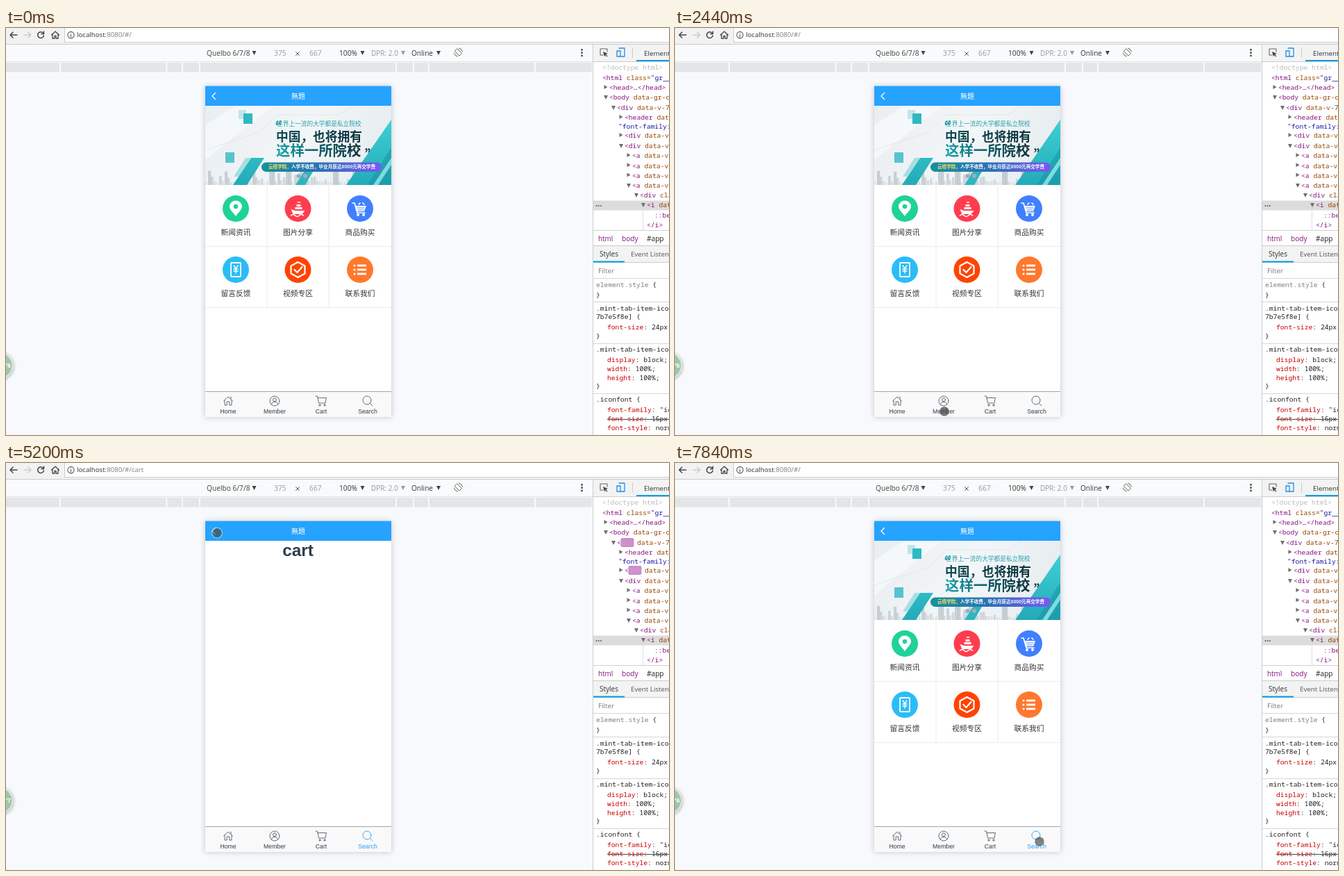
Animation of 955x586 px, one loop 8000 ms. Source, as an HTML page with a canvas:

```html
<!DOCTYPE html>
<html lang="en">
<head>
<meta charset="utf-8">
<title>Tab bar demo</title>
<style>
html, body { margin: 0; width: 100%; height: 100%; overflow: hidden; background: #f8f9fc; }
canvas { display: block; }
</style>
</head>
<body>
<canvas id="stage" width="955" height="586"></canvas>
<script>
const ctx = document.getElementById("stage").getContext("2d");
const LOOP = 8000;
const UI = '"Open Sans", "Noto Sans", sans-serif';
const MONO = '"Noto Sans Mono", "DejaVu Sans Mono", monospace';
const CJK = '"Noto Sans CJK SC", "Noto Sans CJK", sans-serif';
const ARIAL = '"Liberation Sans", Arial, sans-serif';
const PURPLE = "#881280", BROWN = "#994500", NAVY = "#1a1aa6", BLUE = "#26a2ff";

// cursor keys: time, x, y
const path = [
  [0, 870, 602], [69, 870, 602], [70, 854, 589], [360, 486, 201], [480, 486, 201],
  [690, 390, 194], [830, 378, 187], [990, 372, 184], [1150, 372, 184], [1450, 370, 300],
  [1980, 396, 588], [2080, 396, 588], [2290, 388, 552], [2560, 388, 552], [2980, 448, 551],
  [3360, 454, 549], [3520, 454, 549], [3900, 521, 547], [4360, 521, 547], [5080, 306, 101],
  [5140, 306, 101], [5280, 301, 100], [5950, 301, 100], [6380, 505, 570], [6440, 505, 570],
  [6800, 530, 574], [7220, 535, 541], [7300, 535, 541], [7540, 541, 539], [7840, 525, 545],
  [8000, 525, 545]
];
const routes = [[0, ""], [2650, "member"], [3210, "cart"], [3830, "search"],
  [5050, "cart"], [5590, "member"], [5750, ""]];
const tabs = [[0, -1], [2650, 1], [3210, 2], [3830, 3]];
const badges = [[0, "76"], [290, "75"], [2210, "76"], [4900, "77"], [6200, "76"]];
// DOM update flashes: time, whether the head flashes too
const flashes = [[2900, 1], [3330, 1], [3800, 1], [5100, 0], [5600, 0], [5870, 0]];
const presses = [2360, 3130, 3760, 5000, 5540, 5700];

const at = (list, t) => list.filter(k => k[0] <= t).pop()[1];

function cursorAt(t) {
  const i = Math.max(1, path.findIndex(k => k[0] > t));
  const [t0, x0, y0] = path[i - 1], [t1, x1, y1] = path[i];
  const p = (t - t0) / (t1 - t0), e = p * p * (3 - 2 * p);
  return [x0 + (x1 - x0) * e, y0 + (y1 - y0) * e];
}

function rect(x, y, w, h, color) {
  ctx.fillStyle = color;
  ctx.fillRect(x, y, w, h);
}

function disc(x, y, r, color) {
  ctx.fillStyle = color;
  ctx.beginPath();
  ctx.arc(x, y, r, 0, 7);
  ctx.fill();
}

function poly(color, ...p) {
  ctx.fillStyle = color;
  ctx.beginPath();
  for (let i = 0; i < p.length; i += 2) ctx.lineTo(p[i], p[i + 1]);
  ctx.fill();
}

function pill(x, y, w, h, r, color) {
  ctx.fillStyle = color;
  ctx.beginPath();
  ctx.roundRect(x, y, w, h, r);
  ctx.fill();
}

function shape(d, x, y, color, width) {
  const p = new Path2D(d);
  ctx.save();
  ctx.translate(x, y);
  ctx.lineJoin = ctx.lineCap = "round";
  if (width) {
    ctx.strokeStyle = color;
    ctx.lineWidth = width;
    ctx.stroke(p);
  } else {
    ctx.fillStyle = color;
    ctx.fill(p, "evenodd");
  }
  ctx.restore();
}

// y is the visual middle of the line; returns the end x
function text(s, x, y, size, color, font = UI, align = "left", weight = 400) {
  ctx.font = `${weight} ${size}px ${font}`;
  ctx.textAlign = align;
  ctx.fillStyle = color;
  ctx.fillText(s, x, y + size * 0.36);
  return x + ctx.measureText(s).width;
}

const code = (s, x, y, color) => text(s, x, y, 9.7, color, MONO);
const ring = (x, y, r) => `M${x + r} ${y}A${r} ${r} 0 1 1 ${x - r} ${y}A${r} ${r} 0 1 1 ${x + r} ${y}`;
const caret = (x, y, color, s = 3) => poly(color, x - s, y - s, x + s, y - s, x, y + s);

function linear(x0, y0, x1, y1, ...colors) {
  const g = ctx.createLinearGradient(x0, y0, x1, y1);
  colors.forEach((c, i) => g.addColorStop(i / (colors.length - 1), c));
  return g;
}

function toolbar(route) {
  rect(0, 0, 955, 23, "#f2f2f2");
  rect(84, 0, 871, 20, "#fff");
  rect(84, 20, 871, 1, "#ccc");
  rect(84, 0, 1, 20, "#ccc");
  rect(0, 23, 955, 1, "#c9cbcd");
  shape("M5 0H-5M-1 -4L-5 0L-1 4", 11, 10, "#444", 1.5);
  shape("M-5 0H5M1 -4L5 0L1 4", 31, 10, "#ccc", 1.5);
  shape("M4 -2A4.4 4.4 0 1 0 4.4 1M4.5 -5V-1.5H1", 50, 10, "#444", 1.5);
  shape("M-5.5 0L0 -5L5.5 0M-4 -1V5H-1V1.5H1V5H4V-1", 71, 10, "#444", 1.3);
  shape(ring(0, 0, 4.6) + "M0 -.5V2.5M0 -2.5V-2.4", 93.5, 10, "#555", 1.1);
  const x = text("localhost", 102, 10, 9.7, "#333");
  text(":8080/#/" + route, x, 10, 9.7, "#7d7d7d");

  rect(0, 24, 846, 24, "#f9fafb");
  rect(0, 48, 846, 1, "#dfe1e3");
  text("Quelbo 6/7/8", 289, 36, 10.2, "#444");
  caret(357.5, 36, "#444");
  text("375", 386, 36, 10.3, "#999");
  shape("M-2.5 -2.5L2.5 2.5M2.5 -2.5L-2.5 2.5", 420, 37, "#555", 1);
  text("667", 437, 36, 10.3, "#999");
  text("100%", 480, 36, 10.2, "#333");
  caret(513.5, 36, "#444");
  text("DPR: 2.0", 526, 36, 10, "#999");
  caret(572, 36, "#999");
  text("Online", 584, 36, 10.1, "#333");
  caret(623, 36, "#444");
  shape("M-1.5 -5L5 1.5L1.5 5L-5 -1.5ZM-6 1A6 6 0 0 0 -1 6M6 -1A6 6 0 0 0 1 -6", 651.5, 35, "#666", 1);
  for (let i = -1; i < 2; i++) disc(829.5, 35.5 + i * 4.2, 1.5, "#555");

  rect(0, 50, 844, 13.5, "#e4e5e6");
  for (const gap of [78, 231.5, 254, 279, 562, 587, 609, 762]) rect(gap - 1, 50, 2, 13.5, "#f8f9fc");
}

function tag(s, x, y, open) {
  if (open === 1) caret(x - 5, y, "#6e6e6e", 3);
  if (open === 0) poly("#6e6e6e", x - 7.5, y - 4, x - 2.5, y - 1, x - 7.5, y + 2);
  const [, name, attr, value] = s.match(/^(\S*)([^"]*)(.*)$/);
  x = code(name, x, y, PURPLE);
  x = code(attr, x, y, BROWN);
  code(value, x, y, NAVY);
}

function rule(y, name, value) {
  const x = code(name, 866, y, "#c80000");
  return code(": " + value, x, y, "#222");
}

function flash(x, y, name, level) {
  if (level <= 0) return;
  const w = name.length * 5.82;
  pill(x - 0.5, y - 7, w + 1.5, 13, 2, `rgba(193,122,191,${level})`);
  code(name, x, y, `rgba(226,180,222,${level})`);
}

function devtools(t) {
  rect(846, 24, 109, 562, "#fff");
  rect(846, 24, 109, 24, "#f3f3f3");
  rect(846, 48, 109, 1, "#ccc");
  shape("M-1 4H-5V-5H5V-1", 861, 35, "#666", 1.1);
  shape("M-1 -1L6 2L3 3L5.5 5.5L4.5 6.5L2 4L1 6.5Z", 861, 35, "#444");
  shape("M-3 -6H5V6H-1M-6 -2H-1V6H-6Z", 886, 35, "#1a8ff0", 1.3);
  rect(902, 28, 1, 15, "#ccc");
  text("Elements", 919, 36, 9.8, "#333");
  rect(908, 46, 47, 2, "#039be5");

  rect(846, 248.5, 109, 14, "#dcdcdc");
  rect(917, 263, 1, 28, "#ddd");
  code("<!doctype html>", 859, 57, "#bbb");
  tag('<html class="gr__', 859, 72);
  tag("<head>…</head>", 869, 86, 0);
  tag("<body data-gr-c", 869, 100, 1);
  tag("<div data-v-7b", 880, 115, 1);
  tag("<header data-v", 891, 129, 0);
  code('"font-family:', 882, 142, NAVY);
  tag("<div data-v-7", 891, 155, 0);
  tag("<div data-v-7", 891, 170, 1);
  for (let i = 0; i < 4; i++) tag("<a data-v-7", 902, 184 + i * 14.3, i > 2 ? 1 : 0);
  tag("<div class", 913, 241, 1);
  tag("<i data-v", 923, 255, 1);
  for (let i = 0; i < 3; i++) disc(850.5 + i * 3.2, 256, 1.1, "#666");
  code("::before", 934, 270, PURPLE);
  code("</i>", 923, 284, PURPLE);

  const last = flashes.filter(f => f[0] <= t).pop();
  if (last) {
    const level = 0.95 * Math.max(0, 1 - (t - last[0]) / 1350) ** 1.5;
    if (last[1]) flash(875, 86, "head", level);
    flash(886, 115, "div", level);
    flash(897, 155, "div", level);
  }

  rect(846, 291, 109, 295, "#fff");
  rect(846, 291, 109, 1, "#d0d0d0");
  text("html", 853, 303, 9.9, PURPLE);
  text("body", 887, 303, 10.1, PURPLE);
  text("#app", 923, 303, 10.1, "#222");
  rect(846, 313, 109, 24, "#f3f3f3");
  rect(846, 313, 109, 1, "#ccc");
  rect(846, 337, 109, 1, "#ccc");
  text("Styles", 855, 325, 10, "#333");
  text("Event Listeners", 900, 325, 9.8, "#555");
  rect(846, 335.5, 45, 2, "#039be5");
  text("Filter", 853, 349, 9.8, "#777");
  for (const y of [360, 394, 454, 526]) rect(846, y, 109, 1, "#d6d6d6");

  code("{", code("element.style ", 850, 370, "#808080"), 370, "#222");
  for (const y of [385, 444, 516]) code("}", 850, y, "#222");
  for (const y of [404, 463]) code(".mint-tab-item-icon", 850, y, "#222");
  code("7b7e5f8e] {", 850, 416, "#222");
  rule(431, "font-size", "24px;");
  rule(478, "display", "block;");
  rule(491, "width", "100%;");
  rule(504, "height", "100%;");
  code(".iconfont {", 850, 535, "#222");
  rule(550, "font-family", '"iconfont"');
  rule(563, "font-size", "16px;");
  rect(866, 563, 89, 1, "#444");
  rule(576, "font-style", "normal;");
  rect(845, 24, 1, 562, "#cdcdcd");
}

function banner() {
  ctx.save();
  ctx.beginPath();
  ctx.rect(287, 112, 268, 114);
  ctx.clip();
  rect(287, 112, 268, 114, linear(287, 112, 555, 226, "#e9eef2", "#f3f6f8", "#e3eaee"));
  poly("#f5f8fa", 287, 140, 330, 112, 385, 112, 287, 190);
  shape("M365 150L390 125H480L500 112M287 176L365 150", 0, 0, "#d9e3e8", 0.7);
  // skyline
  for (let i = 0; i < 68; i++) {
    const r = Math.abs(Math.sin(i * 12.99) * 43758.5) % 1;
    const h = 4 + r * r * 21;
    rect(287 + i * 4, 226 - h, 2 + r * 2.5, h, `rgba(120,138,150,${0.16 + r * 0.2})`);
  }
  const teal = linear(0, 130, 0, 226, "#3fd0d4", "#23abb8");
  rect(335, 118, 11, 13, "#bfe6ea");
  rect(342, 123, 13, 15, "#2fb9c4");
  rect(316, 179, 13, 15, "#55c4cf");
  poly(teal, 353, 187, 372, 187, 347, 226, 327, 226);
  poly("#a5dfe4", 345, 187, 353, 187, 335, 214, 328, 214);
  poly(teal, 555, 132, 555, 226, 490, 226);
  poly("rgba(20,145,160,.5)", 555, 172, 555, 226, 521, 226);
  poly("#7fdbe0", 555, 187, 555, 197, 536, 226, 529, 226);
  poly("#2fb5bf", 429, 207, 442, 207, 431, 226, 417, 226);

  text("“", 376, 143, 21, "#1d9aa5", CJK, "left", 900);
  text("世界上一流的大学都是私立院校", 390, 138, 8.7, "#25a0aa", CJK);
  text("中国，也将拥有", 389, 157, 17.7, linear(389, 0, 513, 0, "#0d4a52", "#0a3037"), CJK, "left", 900);
  text("这样一所院校", 389, 177, 20.4, linear(389, 0, 513, 0, "#16a3ad", "#12606a", "#0a2b32"), CJK, "left", 900);
  text("”", 517, 183, 19, "#0d3b42", CJK, "left", 900);
  pill(368, 193.5, 173, 13.5, 6.7, linear(368, 0, 541, 0, "#15919e", "#2d70b5", "#7b57f5"));
  const x = text("云梧学院，", 378, 200, 6.6, "#ffe05a", CJK, "left", 700);
  text("入学不收费，毕业月薪达8000元再交学费", x, 200, 6.6, "#fff", CJK, "left", 700);
  disc(421.5, 213, 3, "#a3adb3");
  disc(431, 213, 3, "#a3adb3");
  ctx.restore();
}

const cells = [
  ["新闻资讯", "#1fd298", (x, y) =>
    shape("M0 11C-3 6 -9 2 -9 -3A9 8.5 0 0 1 9 -3C9 2 3 6 0 11Z" + ring(0, -3, 3.3), x, y, "#fff")],
  ["图片分享", "#ff3d4f", (x, y) => {
    shape("M-10 1L-4 3H10L6 8H-7ZM-4 -2H6V1H-4ZM-2 -6H4V-3H-2Z", x, y, "#fff");
    shape("M-10 10Q-7 7 -4 10T2 10T8 10M0 -9H3", x, y, "#fff", 1.6);
  }],
  ["商品购买", "#4080ff", (x, y) => {
    shape("M-7 -4H9L6 4H-5Z" + ring(-3, 9, 2) + ring(5, 9, 2), x, y, "#fff");
    shape("M-11 -8H-8L-4 6H7M-2 -6L0 -8M4 -8L6 -6", x, y, "#fff", 1.7);
    shape("M-4 -1H6M-3 2H5", x, y, "#4080ff", 0.9);
  }],
  ["留言反馈", "#2abdf7", (x, y) => {
    shape("M-6 -10H6Q7 -10 7 -9V9Q7 10 6 10H-6Q-7 10 -7 9V-9Q-7 -10 -6 -10Z", x, y, "#fff", 1.8);
    shape("M-3 -6L0 -2L3 -6M0 -2V5M-3 -1H3M-3 2H3", x, y, "#fff", 1.4);
  }],
  ["视频专区", "#ff4303", (x, y) =>
    shape("M0 -11L10 -5.5V5.5L0 11L-10 5.5V-5.5ZM-5 0L-1 4L6 -4", x, y, "#fff", 2.2)],
  ["联系我们", "#ff782d", (x, y) => {
    for (const dy of [-6, 0, 6]) {
      disc(x - 8, y + dy, 1.6, "#fff");
      rect(x - 4, y + dy - 1.4, 13, 2.8, "#fff");
    }
  }]
];

const tabItems = [
  ["Home", "M-6.5 0L0 -6L6.5 0M-5 -1V6H-1.8V1H1.8V6H5V-1M4 -6V-3"],
  ["Member", ring(0, 0, 7) + ring(0, -1.8, 2.5) + "M-4.5 5C-4 0 4 0 4.5 5"],
  ["Cart", "M-8 -7H-5.5L-3.5 3H6L7.5 -4.5H-5" + ring(-2, 6, 1.2) + ring(5, 6, 1.2)],
  ["Search", ring(-1, -1, 6) + "M3.4 3.4L7 7"]
];

function phone(route, tab) {
  ctx.save();
  ctx.shadowColor = "rgba(0,0,0,.22)";
  ctx.shadowBlur = 8;
  rect(287, 83.5, 268, 476.5, "#fff");
  ctx.restore();
  rect(287, 83.5, 268, 28.5, BLUE);
  shape("M2.5 -4.5L-2 0L2.5 4.5", 299, 98, "#fff", 1.4);
  text("無題", 421, 98, 10, "#fff", CJK, "center");

  if (route) {
    text(route, 420.5, 125.5, 24.4, "#2c3e50", ARIAL, "center", 700);
  } else {
    banner();
    for (const x of [375.5, 464.5]) rect(x, 226, 1, 176, "#ececec");
    for (const y of [314, 402]) rect(287, y, 268, 1, "#ececec");
    cells.forEach(([label, color, draw], i) => {
      const x = 331 + (i % 3) * 89.5, y = i < 3 ? 260 : 348;
      disc(x, y, 19, color);
      draw(x, y);
      text(label, x, y + 34, 10.75, "#333", CJK, "center");
    });
  }

  rect(287, 523, 268, 37, "#f9f9f9");
  rect(287, 523, 268, 1, "#a6a6a6");
  tabItems.forEach(([label, d], i) => {
    const x = 320 + i * 67, on = i === tab;
    shape(d, x, 537, on ? BLUE : "#555e66", 0.9);
    text(label, x, 552, 8.7, on ? BLUE : "#2c3e50", ARIAL, "center");
  });
}

function badge(label) {
  ctx.save();
  ctx.shadowColor = "rgba(0,0,0,.35)";
  ctx.shadowBlur = 5;
  ctx.shadowOffsetY = 1;
  disc(-9, 486, 19.5, "#dce9df");
  ctx.restore();
  disc(-9, 486, 17.5, "#9fc6aa");
  text(label, 7, 485.5, 9, "#fff", ARIAL, "right", 700);
}

function cursor(t) {
  const [x, y] = cursorAt(t);
  const down = presses.some(p => t >= p && t < p + 200);
  disc(x, y, 6.8, `rgba(70,70,70,${down ? 0.75 : 0.66})`);
  if (y > 84 && y < 112) shape(ring(0, 0, 7.4), x, y, "rgba(175,225,215,.8)", 1.1);
}

function draw(t) {
  const route = at(routes, t);
  rect(0, 0, 955, 586, "#f8f9fc");
  toolbar(route);
  phone(route, at(tabs, t));
  devtools(t);
  badge(at(badges, t));
  cursor(t);
}

const start = performance.now();
function tick() {
  draw((performance.now() - start) % LOOP);
  requestAnimationFrame(tick);
}
tick();
</script>
</body>
</html>
```
